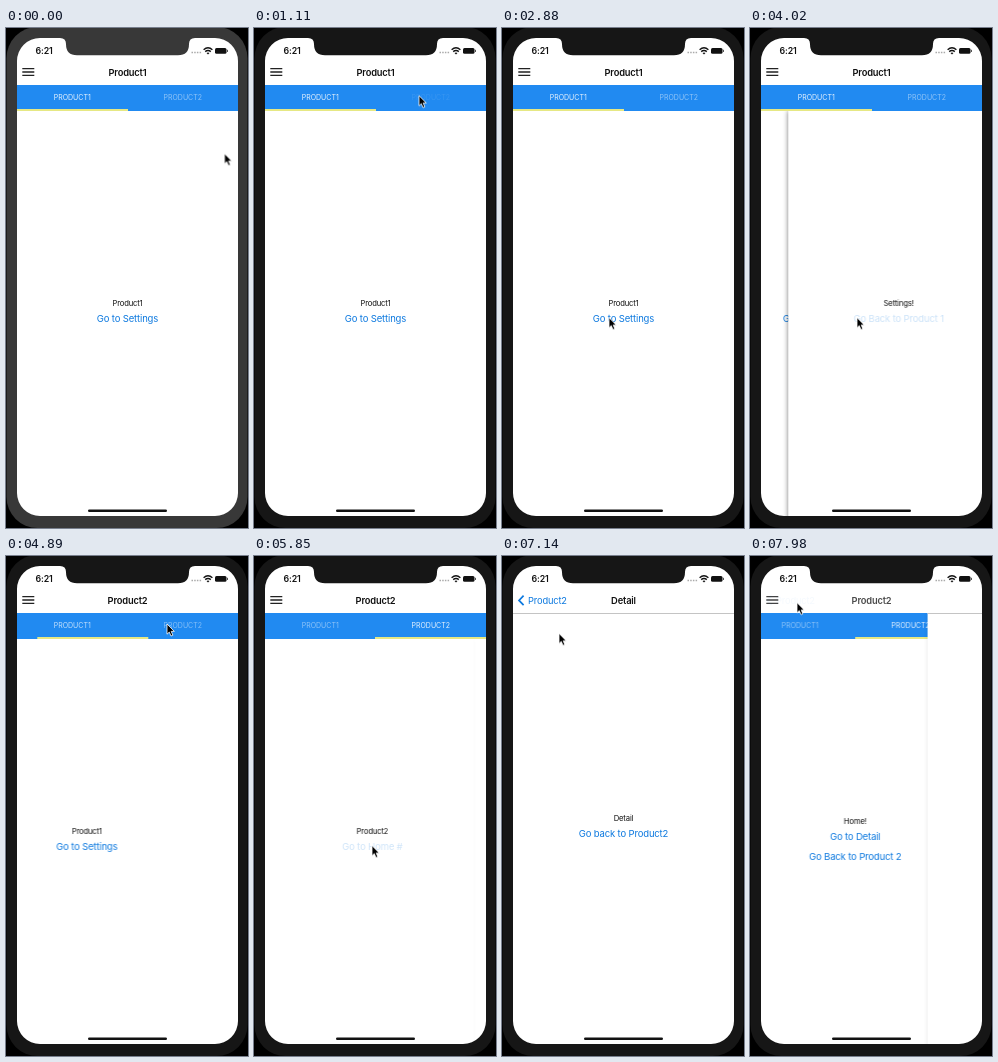
Write an HTML page that moves like this. It is 242x500 px and loops after 8 s.

```html
<!DOCTYPE html>
<html lang="en">
<head>
<meta charset="utf-8">
<title>Tab and stack navigation</title>
<style>
  :root {
    --link: #0d79df;
    --push: cubic-bezier(.2833, .99, .31833, .99);
    --flat: 0 0 5px rgba(0, 0, 0, 0);
    --raised: 0 0 5px rgba(0, 0, 0, .65);
  }
  html, body { margin: 0; width: 100%; height: 100%; overflow: hidden; background: #000; }
  body { position: relative; font: 400 7.65px/12px Inter, Roboto, sans-serif; letter-spacing: -.02em; color: #111; }
  div, svg, p, i { position: absolute; display: block; }
  svg { left: 0; top: 0; }

  .stage { left: 0; top: 0; width: 242px; height: 500px; overflow: hidden; }
  .screen { left: 11px; top: 0; width: 221px; height: 500px; background: #fff; overflow: hidden; }
  .card { left: 0; top: 0; width: 221px; height: 100%; background: #fff; }
  p { margin: 0; left: 0; width: 221px; top: calc(var(--y) * 1px - 6px); text-align: center; white-space: nowrap; }
  .link { font-size: 9.5px; color: var(--link); }

  /* One 8 s timeline shared by every moving part */
  .anim { animation: var(--k) 8s var(--ease, linear) infinite; }
  .move { --ease: var(--push); }

  .header { left: 0; top: 0; width: 221px; height: 57px; background: #fff; }
  .header p { --y: 45; font-size: 9.3px; font-weight: 600; }
  .header .back { left: 15px; width: auto; font-size: 9.3px; font-weight: 400; color: var(--link); }
  .layer { left: 0; top: 0; width: 221px; height: 57px; }
  .body { left: 0; top: 57px; width: 221px; height: 443px; overflow: hidden; }
  .tabs { left: 0; top: 0; width: 221px; height: 25.5px; background: #218af1; color: #fff; }
  .tabs p { --y: 13; width: 110.5px; font-size: 7px; letter-spacing: 0; }
  .tabs p + p { left: 110.5px; }
  .tabs i { left: 0; bottom: 0; width: 110.5px; height: 1.2px; background: #e6e884; }
  .view { left: 0; top: 25.5px; width: 221px; height: 418px; overflow: hidden; }
  .pager { left: 0; top: 0; width: 442px; height: 418px; }
  .page { left: 0; top: 0; width: 221px; height: 418px; overflow: hidden; }
  .page + .page { left: 221px; }
  .detail { top: -1px; border-top: 1px solid #c4c4c4; }

  @keyframes bezel { 0%, 3.75% { fill: #383838 } 5%, 100% { fill: #161616 } }
  @keyframes cursor {
    0%, 3.75% { transform: translate(218.5px, 125.6px) }
    10.6%, 18% { transform: translate(165px, 67.6px) }
    23.5%, 27.5% { transform: translate(70px, 68px) }
    34.5%, 51.5% { transform: translate(107px, 289.6px) }
    59%, 64% { transform: translate(161px, 68px) }
    70.5%, 75% { transform: translate(118px, 289.6px) }
    79%, 83.5% { transform: translate(112px, 280px) }
    89%, 90% { transform: translate(57px, 77.4px) }
    93.5%, 100% { transform: translate(47px, 46.6px) }
  }

  @keyframes pager {
    0%, 14.1% { transform: none } 18%, 25.3% { transform: translateX(-221px) }
    29%, 60.7% { transform: none } 64.5%, 100% { transform: translateX(-221px) }
  }
  @keyframes marker {
    0%, 14.1% { transform: none } 18%, 25.3% { transform: translateX(110.5px) }
    29%, 60.7% { transform: none } 64.5%, 100% { transform: translateX(110.5px) }
  }
  @keyframes tab1 {
    0%, 14.1% { opacity: .9 } 18%, 24.4% { opacity: .5 } 24.9%, 25.3% { opacity: .1 }
    28.5%, 60.7% { opacity: .9 } 64.5%, 100% { opacity: .5 }
  }
  @keyframes tab2 {
    0%, 13% { opacity: .5 } 13.6%, 14.1% { opacity: .1 } 17.5%, 25.3% { opacity: .9 }
    29%, 59.5% { opacity: .5 } 60.2%, 60.7% { opacity: .1 } 64%, 100% { opacity: .9 }
  }
  @keyframes title1 { 0% { opacity: 1 } 14.1% { opacity: 0 } 25.3% { opacity: 1 } 60.7%, 100% { opacity: 0 } }
  @keyframes title2 { 0% { opacity: 0 } 14.1% { opacity: 1 } 25.3% { opacity: 0 } 60.7%, 100% { opacity: 1 } }

  /* A card's shadow grows as it slides in */
  @keyframes settings {
    0%, 37% { transform: translateX(221px); box-shadow: var(--flat) }
    43.25%, 50.04% { transform: none; box-shadow: var(--raised) }
    56.29%, 100% { transform: translateX(221px); box-shadow: var(--flat) }
  }
  @keyframes under-settings {
    0%, 37% { transform: none } 43.25%, 50.04% { transform: translateX(-66px) } 56.29%, 100% { transform: none }
  }
  @keyframes home {
    0%, 73.05% { transform: translateX(221px); box-shadow: var(--flat) }
    79.3%, 100% { transform: none; box-shadow: var(--raised) }
  }
  @keyframes under-home { 0%, 73.05% { transform: none } 79.3%, 100% { transform: translateX(-66px) } }

  /* The closing pop is cut by the loop, so its curve is the first part of --push */
  @keyframes detail {
    0%, 81.25% { transform: translateX(221px); box-shadow: var(--flat) }
    87.5% { transform: none; box-shadow: var(--raised) }
    98.04% { transform: none; box-shadow: var(--raised); animation-timing-function: cubic-bezier(.4075, .5272, .6614, .8277) }
    100% { transform: translateX(179px); box-shadow: 0 0 5px rgba(0, 0, 0, .12) }
  }
  @keyframes under-detail {
    0%, 81.25% { transform: none } 87.5% { transform: translateX(-66px) }
    98.04% { transform: translateX(-66px); animation-timing-function: cubic-bezier(.4075, .5272, .6614, .8277) }
    100% { transform: translateX(-12.6px) }
  }
  @keyframes root-bar {
    0%, 81.25% { opacity: 1 } 87.5% { opacity: 0 }
    98.04% { opacity: 0; animation-timing-function: cubic-bezier(.4075, .5272, .6614, .8277) }
    100% { opacity: .81 }
  }
  @keyframes menu { 0%, 81.25% { opacity: 1 } 84%, 98.04% { opacity: 0 } 99.6%, 100% { opacity: .85 } }
  @keyframes detail-bar { 0%, 81.25% { opacity: 0 } 87.5%, 98.04% { opacity: 1 } 99.5%, 100% { opacity: 0 } }
  @keyframes back-bar {
    0%, 81.25% { opacity: 0 } 87.5%, 97% { opacity: 1 } 97.8%, 98.1% { opacity: .2 } 100% { opacity: .02 }
  }

  @keyframes press-settings { 0%, 36.2% { opacity: 1 } 36.9%, 37.1% { opacity: .2 } 40%, 100% { opacity: 1 } }
  @keyframes press-product1 { 0%, 49% { opacity: 1 } 49.8%, 50.25% { opacity: .2 } 53%, 100% { opacity: 1 } }
  @keyframes press-home { 0%, 72% { opacity: 1 } 72.8%, 73.2% { opacity: .2 } 76%, 100% { opacity: 1 } }
  @keyframes press-detail { 0%, 80% { opacity: 1 } 80.9%, 81.3% { opacity: .2 } 84%, 100% { opacity: 1 } }
</style>
</head>
<body>
<div class="stage">
  <div class="screen">
    <div class="body">
      <div class="card anim move" style="--k: under-detail">
        <div class="view">
          <div class="pager anim" style="--k: pager; --ease: ease-out">
            <div class="page">
              <div class="card anim move" style="--k: under-settings">
                <p style="--y: 193.5">Product1</p>
                <p class="link anim" style="--y: 208.5; --k: press-settings">Go to Settings</p>
              </div>
              <div class="card anim move" style="--k: settings">
                <p style="--y: 193.5">Settings!</p>
                <p class="link anim" style="--y: 208.5; --k: press-product1">Go Back to Product 1</p>
              </div>
            </div>
            <div class="page">
              <div class="card anim move" style="--k: under-home">
                <p style="--y: 193.5">Product2</p>
                <p class="link anim" style="--y: 208.5; --k: press-home">Go to Home #</p>
              </div>
              <div class="card anim move" style="--k: home">
                <p style="--y: 183.5">Home!</p>
                <p class="link anim" style="--y: 198.5; --k: press-detail">Go to Detail</p>
                <p class="link" style="--y: 218.5">Go Back to Product 2</p>
              </div>
            </div>
          </div>
        </div>
        <div class="tabs">
          <p class="anim" style="--k: tab1">PRODUCT1</p>
          <p class="anim" style="--k: tab2">PRODUCT2</p>
          <i class="anim" style="--k: marker; --ease: ease-out"></i>
        </div>
      </div>
      <div class="card detail anim move" style="--k: detail; top: 0">
        <p style="--y: 205">Detail</p>
        <p class="link" style="--y: 220">Go back to Product2</p>
      </div>
    </div>

    <div class="header">
      <div class="layer anim move" style="--k: root-bar">
        <p class="anim" style="--k: title1; --ease: step-end">Product1</p>
        <p class="anim" style="--k: title2; --ease: step-end">Product2</p>
      </div>
      <svg class="anim" style="--k: menu" width="221" height="57">
        <path d="M5.3 40.6h12M5.3 44h12M5.3 47.4h12" stroke="#222" stroke-width="1.3"/>
      </svg>
      <div class="layer anim" style="--k: detail-bar"><p>Detail</p></div>
      <div class="layer anim" style="--k: back-bar">
        <svg width="221" height="57">
          <path d="M10.6 39.6 6 44.4l4.6 4.8" fill="none" stroke="#0d79df" stroke-width="1.7"/>
        </svg>
        <p class="back">Product2</p>
      </div>
    </div>
  </div>

  <svg width="242" height="500">
    <defs>
      <mask id="frame">
        <path fill="#fff" d="M0 0H242V500H0z"/>
        <path fill="#000" d="M34 10H54q6 0 6 6q0 11.3 11 11.3H172q11 0 11-11.3q0-6 6-6H209a23 23 0 0 1 23 23V465a23 23 0 0 1-23 23H34a23 23 0 0 1-23-23V33a23 23 0 0 1 23-23z"/>
      </mask>
    </defs>
    <g mask="url(#frame)">
      <path d="M0 0H242V500H0z"/>
      <rect class="anim" style="--k: bezel" x=".5" y="-1" width="241" height="501" rx="31"/>
    </g>
    <text x="29.5" y="26" font-size="8.8" font-weight="600" fill="#111">6:21</text>
    <path d="M185.5 24.5h10" stroke="#aaa" stroke-width="1.4" stroke-dasharray="1.5 1.2"/>
    <path d="M197.6 21.7q4.4-3.7 8.8 0M199.2 23.6q2.8-2.2 5.6 0" fill="none" stroke="#111" stroke-width="1.4"/>
    <path d="M200.5 24.9q1.5-1 3 0L202 26.5z" fill="#111"/>
    <rect x="209" y="20" width="11.5" height="5.8" rx="1.5" fill="#111"/>
    <path d="M221.5 21.8v2.2" stroke="#555"/>
    <rect x="82" y="481.4" width="79" height="2.6" rx="1.3" fill="#111"/>
    <path class="anim" style="--k: cursor; --ease: ease-in-out" d="M0 0V10.2L2.3 8.1 4 12 5.9 11.2 4.2 7.4H7.3z" fill="#000" stroke="#fff" stroke-width=".8"/>
  </svg>
</div>
</body>
</html>
```
